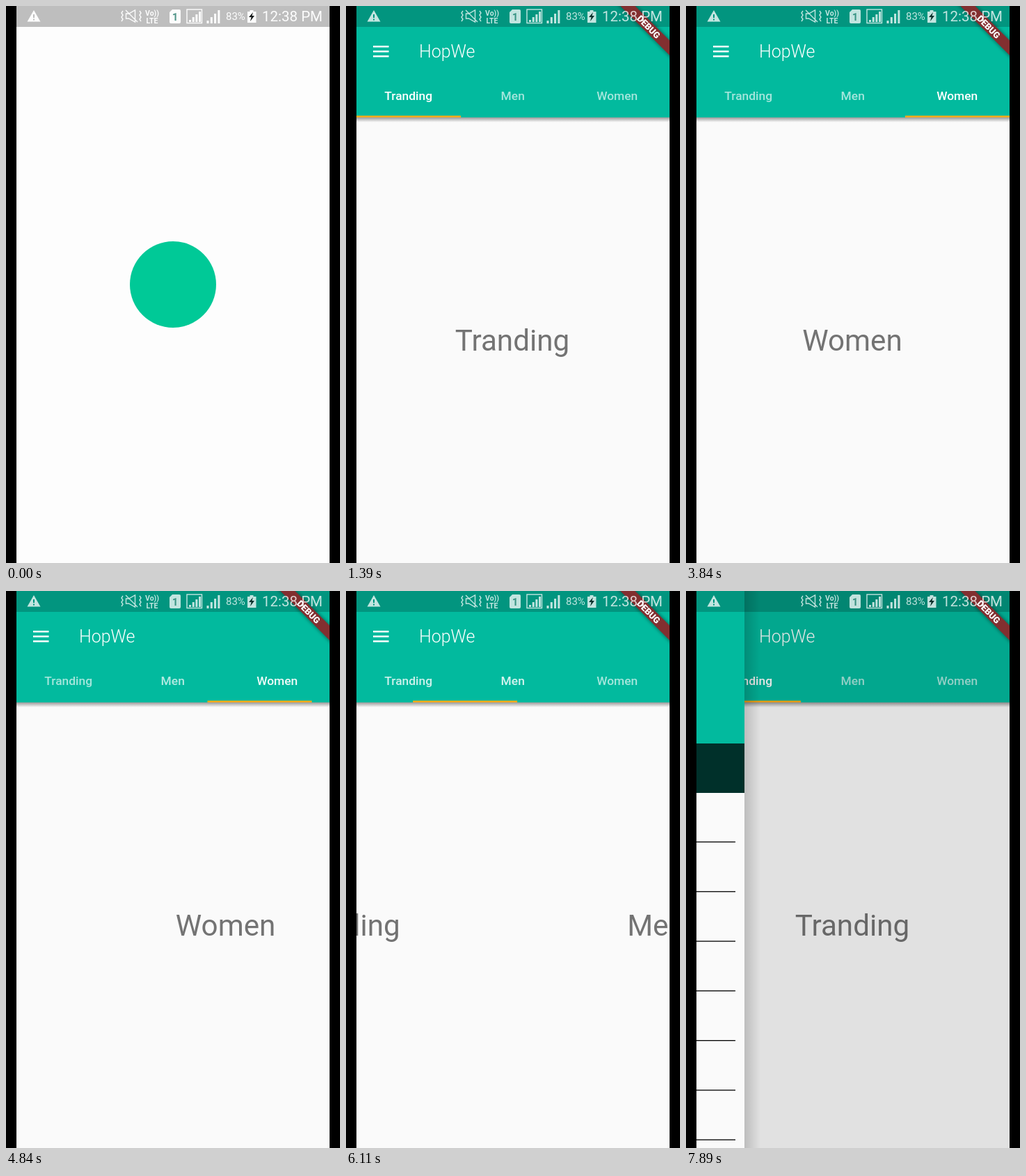
An HTML page for the animation above (8 s loop, 480 by 800 pixels).

```html
<!DOCTYPE html>
<html lang="en">
<head>
<meta charset="utf-8">
<title>Shop tabs</title>
<style>
html, body { margin: 0; width: 100%; height: 100%; overflow: hidden; background: #000; }
svg { display: block; width: 100%; height: 100%; }
text { font-family: Roboto, "Open Sans", sans-serif; }
.mid { text-anchor: middle; }
.label { font-size: 17.4px; font-weight: 500; fill: #fff; }
.page { font-size: 42.2px; fill: #737373; }
.teal { fill: #02ba9e; }
.shade { fill: #000; fill-opacity: .2; }
#status { fill: #fff; stroke: none; }
#status .line { fill: none; stroke: #fff; stroke-width: 1.4; }
</style>
</head>
<body>
<svg viewBox="0 0 480 800" xmlns="http://www.w3.org/2000/svg">
  <defs>
    <clipPath id="screen"><rect x="15" width="450" height="800"/></clipPath>
    <linearGradient id="drop" x2="0" y2="1">
      <stop stop-opacity=".38"/>
      <stop offset="1" stop-opacity="0"/>
    </linearGradient>
    <linearGradient id="side">
      <stop stop-opacity=".16"/>
      <stop offset="1" stop-opacity="0"/>
    </linearGradient>
    <filter id="blur" x="-20%" y="-80%" width="140%" height="260%"><feGaussianBlur stdDeviation="2.5"/></filter>
  </defs>
  <rect width="480" height="800"/>
  <g clip-path="url(#screen)">
    <rect x="15" width="450" height="800" fill="#fafafa"/>
    <g id="strip"></g>
    <rect x="15" y="160" width="450" height="7" fill="url(#drop)"/>
    <rect class="teal" x="15" width="450" height="160"/>
    <rect class="shade" x="15" width="450" height="30"/>
    <path d="M39 58.2h22.5M39 65.2h22.5M39 72.2h22.5" stroke="#fff" stroke-width="2.5"/>
    <text x="105" y="74" font-size="25" font-weight="300" fill="#fff">HopWe</text>
    <g id="labels"></g>
    <rect id="marker" x="15" y="157.5" width="150" height="2.5" fill="#ffab1a"/>
    <g id="drawer">
      <rect x="15" width="450" height="800" fill-opacity=".1"/>
      <rect x="84" width="23" height="800" fill="url(#side)"/>
      <rect x="15" width="69" height="800" fill="#fafafa"/>
      <rect class="teal" x="15" width="69" height="219"/>
      <rect class="shade" x="15" width="69" height="30"/>
      <rect x="15" y="219" width="69" height="71" fill="#00302a"/>
    </g>
    <g transform="translate(465 0) rotate(45)">
      <rect x="-60" y="34" width="120" height="17" fill-opacity=".4" filter="url(#blur)"/>
      <rect x="-60" y="35" width="120" height="15" fill="#822f30"/>
      <text class="mid" y="47" font-size="12.75" font-weight="900" fill="#fff">DEBUG</text>
    </g>
    <g id="splash">
      <rect x="15" width="450" height="800" fill="#fdfdfd"/>
      <rect x="15" width="450" height="30" fill="#bebebe"/>
      <circle cx="240" cy="400" r="62" fill="#00c997"/>
    </g>
    <g id="status">
      <path fill-rule="evenodd" d="M40 6l9.5 16.5h-19zM39 12v5h2v-5zM39 18.5v2h2v-2z"/>
      <path class="line" d="M172.500 11h4l9-5v17l-9-5h-4zM172 6l17 17"/>
      <path class="line" d="M168 7l-2 3 2 3-2 3 2 3-2 3M192 7l2 3-2 3 2 3-2 3 2 3"/>
      <g class="mid" font-size="10.5" font-weight="700">
        <text x="210" y="14">Vo))</text>
        <text x="210" y="24.5">LTE</text>
      </g>
      <path d="M235 9l4-4h10q2 0 2 2v16q0 2-2 2h-12q-2 0-2-2z"/>
      <text class="mid" x="243" y="20.5" font-size="15" font-weight="700" style="fill:#4f9588">1</text>
      <rect class="line" x="260" y="5" width="21.5" height="19.5"/>
      <text x="316" y="20" font-size="15">83%</text>
      <path d="M350.500 6h5v2h4v16h-12.500v-16h3.500z"/>
      <path d="M355 9l-6 7h3.500l-1.500 6 6-8h-3.500z" fill="#101414"/>
      <text x="368" y="22" font-size="20.5">12:38 PM</text>
    </g>
  </g>
</svg>
<script>
const LOOP = 8000, TAB = 150, PAGE = 450;
const DECAY = 9;      // settle rate per second
const REST = .0025;   // distance at which a page snaps home
const tabs = ["Tranding", "Men", "Women"];

// grip: share of the page dragged before the finger lifts
const drags = [
  { start: 1835, lift: 2000, grip: .6, to: 1 },
  { start: 3225, lift: 3350, grip: .8, to: 2 },
  { start: 4505, lift: 5120, grip: .57, to: 1 },
  { start: 5700, lift: 6170, grip: .6, to: 0 }
];

const $ = id => document.getElementById(id);
const clamp = v => Math.min(1, Math.max(0, v));

function add(parent, tag, attrs, text = "") {
  const el = document.createElementNS("http://www.w3.org/2000/svg", tag);
  for (const k in attrs) el.setAttribute(k, attrs[k]);
  el.textContent = text;
  parent.append(el);
  return el;
}

const labels = tabs.map((name, i) => {
  add($("strip"), "text", { class: "page mid", x: 239 + i * PAGE, y: 495 }, name);
  return add($("labels"), "text", { class: "label mid", x: 89.7 + i * TAB, y: 135 }, name);
});

for (let i = 0; i < 7; i++)
  add($("drawer"), "rect", { x: 15, y: 359.8 + i * 71.3, width: 56, height: 1.3 });

for (let i = 0; i < 4; i++) {
  add($("status"), "rect", { x: 263 + i * 4.7, y: 20 - i * 4, width: 3, height: 3 + i * 4 });
  add($("status"), "rect", { x: 288.5 + i * 5.3, y: 21 - i * 5, width: 3, height: 4 + i * 5 });
}

function travel({ start, lift, grip }, t) {
  if (t < lift) return grip * ((t - start) / (lift - start)) ** 2;
  const left = (1 - grip) * Math.exp(-DECAY * (t - lift) / 1000);
  return left < REST ? 1 : 1 - left;
}

function position(t) {
  let pos = 0;
  for (const d of drags)
    if (t > d.start) pos += (d.to - pos) * travel(d, t);
  return pos;
}

function draw(t) {
  const pos = position(t);
  const splash = 1 - clamp((t - 340) / 490);
  $("strip").setAttribute("transform", `translate(${-pos * PAGE})`);
  $("marker").setAttribute("transform", `translate(${pos * TAB})`);
  labels.forEach((el, i) => el.setAttribute("opacity", .64 + .36 * clamp(1 - Math.abs(pos - i))));
  $("splash").setAttribute("opacity", splash);
  $("status").setAttribute("opacity", .76 + .2 * splash);
  $("drawer").setAttribute("visibility", t < 7890 ? "hidden" : "visible");
}

function tick() {
  draw(performance.now() % LOOP);
  requestAnimationFrame(tick);
}
tick();
</script>
</body>
</html>
```
